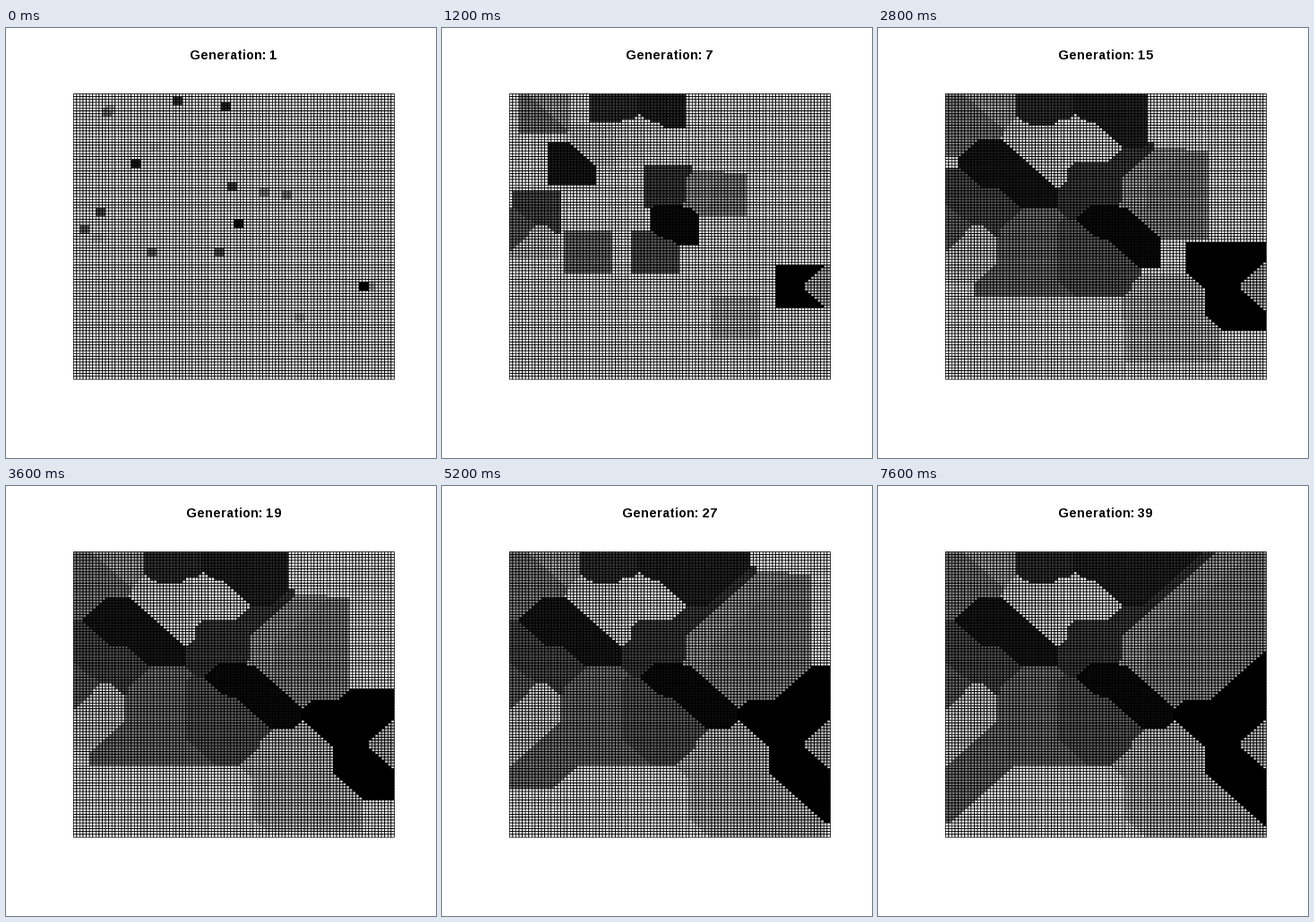
Animation, 480 px wide and 480 px high, one loop 7.8 s. Source, as a matplotlib script:

```python
import numpy as np
import matplotlib.pyplot as plt
from matplotlib.animation import FuncAnimation
from matplotlib.collections import PolyCollection

plt.rcParams["text.hinting_factor"] = 1  # whole-pixel letter spacing

SIZE, DPI = 480, 72
N, FRAMES, STEP_MS = 100, 39, 200
LINE = 0.75

# Plot box with a range of 0..101 and a 4% margin on each side
BOX_X, BOX_Y, BOX_W, BOX_H = 59.04, 59.04, 390.72, 347.52
SPAN = (N + 1) * 1.08
CELL_W, CELL_H = BOX_W / SPAN, BOX_H / SPAN
OFFSET = 0.5 + 0.04 * (N + 1)

# Grain centres (column, row), ordered from black to white
SEEDS = [(90, 67), (51, 45), (19, 24), (47, 4), (32, 2),
         (49, 32), (8, 41), (45, 55), (3, 47), (24, 55),
         (10, 6), (66, 35), (59, 34), (11, 5), (92, 67),
         (70, 78), (7, 50), (25, 18), (41, 14), (40, 94)]


def grow(grid):
    """Each empty cell joins its first occupied neighbour, column by column."""
    pad = np.pad(grid, 1, constant_values=-1)
    out = grid.copy()
    for dx in range(3):
        for dy in range(3):
            out = np.where(out < 0, pad[dx:dx + N, dy:dy + N], out)
    return out


def generations():
    grid = np.full((N, N), -1)
    for k, seed in enumerate(SEEDS):
        grid[seed] = k
    for _ in range(FRAMES):
        grid = grow(grid)
        yield grid


def cell(col, row):
    x0, x1 = BOX_X + (OFFSET + np.array([col, col + 1])) * CELL_W
    y0, y1 = BOX_Y + (OFFSET + np.array([row, row + 1])) * CELL_H
    return np.array([(x0, y0), (x1, y0), (x1, y1), (x0, y1)])


history = list(generations())
# Empty cells have index -1 and share the last grey, white
greys = np.linspace(0, 1, len(SEEDS))

fig = plt.figure(figsize=(SIZE / DPI, SIZE / DPI), dpi=DPI, facecolor="white")
ax = fig.add_axes([0, 0, 1, 1])
ax.set(xlim=(0, SIZE), ylim=(SIZE, 0))
ax.axis("off")

# Each cell is a whole-pixel fill followed by a smooth outline
shapes = []
for c in range(N):
    for r in range(N):
        outline = cell(c, r)
        shapes += [np.round(outline), outline]
cells = PolyCollection(shapes, edgecolors=[(0, 0, 0, 0), (0, 0, 0, 1)],
                       linewidths=[0, LINE * 72 / DPI], antialiaseds=True)
cells.set_snap(False)
ax.add_collection(cells, autolim=False)
title = ax.text(BOX_X + BOX_W / 2, 35, "", ha="center", va="baseline",
                family="Liberation Sans", weight="bold", size=14.4 * 72 / DPI)

colors = np.zeros((2 * N * N, 4))
colors[::2, 3] = 1  # only the fills are opaque


def update(i):
    colors[::2, :3] = greys[history[i].ravel()][:, None]
    cells.set_facecolor(colors)
    title.set_text(f"Generation: {i + 1}")
    return cells, title


anim = FuncAnimation(fig, update, frames=FRAMES, interval=STEP_MS,
                     repeat=True, repeat_delay=0, blit=False)
plt.show()
```
